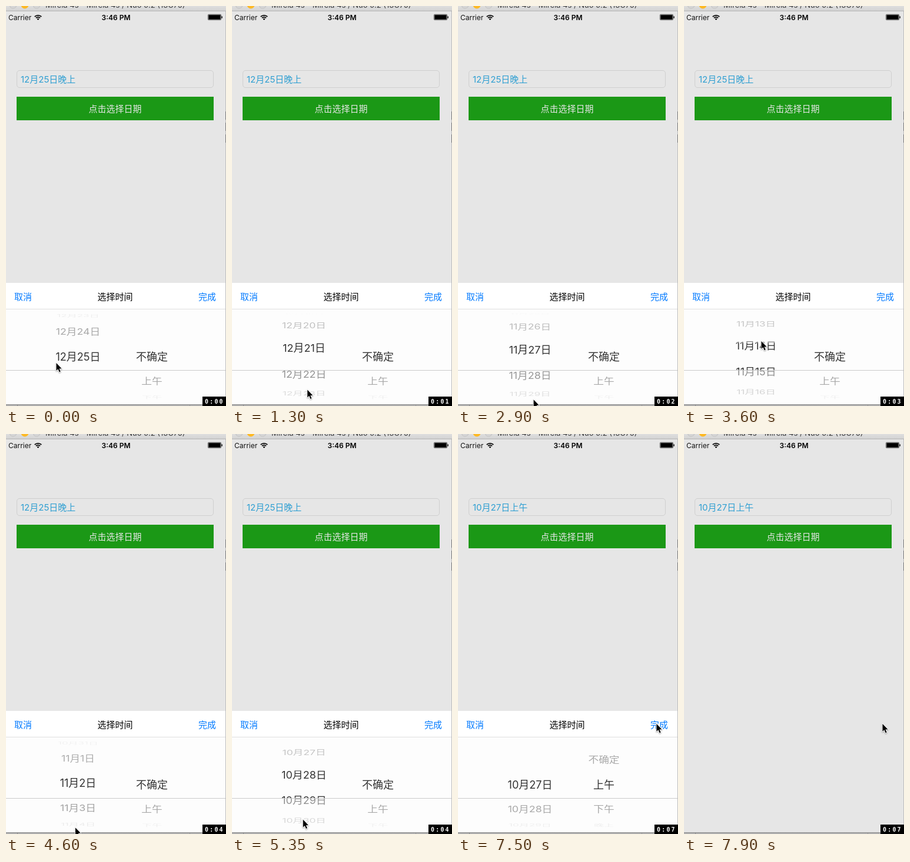
Animation of 374 by 679 pixels, one loop 8 s. Source, as an HTML page with a canvas:

```html
<!DOCTYPE html>
<html lang="zh-CN">
<head>
<meta charset="utf-8">
<style>
html, body { margin: 0; height: 100%; overflow: hidden; background: #e6e6e6; }
canvas { display: block; width: 374px; height: 679px; }
</style>
</head>
<body>
<canvas id="stage"></canvas>
<script>
const W = 374, H = 679, LOOP = 8000;
const FONT = 'Inter, "Noto Sans CJK SC", "Noto Sans CJK", sans-serif';
const canvas = document.getElementById('stage'), g = canvas.getContext('2d');
const dpr = window.devicePixelRatio || 1;
canvas.width = W * dpr;
canvas.height = H * dpr;

// Picker geometry: rows sit on a cylinder seen from the front
const MID = 595, RADIUS = 73.3, STEP = 0.61, BAND = [572, 618];
const PARTS = ['不确定', '上午', '下午', '晚上'];
const DAYS = Array.from({ length: 60 }, (_, i) => {
  const d = new Date(2015, 9, 27 + i);
  return `${d.getMonth() + 1}月${d.getDate()}日`;
});

// [time, row in the centre]
const DAY_KEYS = [[0, 59], [1300, 54.62], [2150, 43.29], [3600, 18.41], [4600, 5.2], [5950, 0]];
const PART_KEYS = [[6200, 0], [6600, 0.85], [7050, 1]];
// [time, x, y] of the pointer tip
const POINTER = [
  [0, 85, 606], [450, 120, 565], [1300, 128, 655], [1550, 129, 565], [2150, 129, 677],
  [2450, 130, 562], [2900, 128, 672], [3300, 131, 556], [3600, 131, 569], [4600, 117, 671],
  [4900, 122, 562], [5350, 120, 668], [5900, 238, 600], [6200, 245, 606], [6600, 246, 521],
  [6900, 252, 524], [7200, 337, 492]
];

const clamp = x => Math.max(0, Math.min(1, x));
const smooth = x => x * x * (3 - 2 * x);

function findSpan(keys, t) {
  let i = 0;
  while (i < keys.length - 2 && t >= keys[i + 1][0]) i++;
  return [i, clamp((t - keys[i][0]) / (keys[i + 1][0] - keys[i][0]))];
}

// Cubic curve through the keys, at rest at both ends
function glide(keys, t) {
  const [i, u] = findSpan(keys, t);
  const slope = k => k > 0 && k < keys.length - 1
    ? (keys[k + 1][1] - keys[k - 1][1]) / (keys[k + 1][0] - keys[k - 1][0]) : 0;
  const [t0, a] = keys[i], [t1, b] = keys[i + 1], v = 1 - u;
  return a + (b - a) * smooth(u) + (t1 - t0) * u * v * (slope(i) * v - slope(i + 1) * u);
}

function pointerAt(t) {
  const [i, u] = findSpan(POINTER, t), a = POINTER[i], b = POINTER[i + 1], s = smooth(u);
  return [a[1] + (b[1] - a[1]) * s, a[2] + (b[2] - a[2]) * s];
}

function rect(x, y, w, h, color) {
  g.fillStyle = color;
  g.fillRect(x, y, w, h);
}

function text(str, x, y, size, color, align = 'left', weight = 400) {
  g.font = `${weight} ${size}px ${FONT}`;
  g.textAlign = align;
  g.fillStyle = color;
  g.fillText(str, x, y);
}

function disc(x, y, r, color) {
  g.fillStyle = color;
  g.beginPath();
  g.arc(x, y, r, 0, 7);
  g.fill();
}

function clipped(x, y, w, h, draw) {
  g.save();
  g.beginPath();
  g.rect(x, y, w, h);
  g.clip();
  draw();
  g.restore();
}

function titleBar() {
  const fill = g.createLinearGradient(0, 0, 0, 9);
  fill.addColorStop(0, '#dedede');
  fill.addColorStop(1, '#d2d2d2');
  rect(0, 0, W, 9, fill);
  rect(0, 8, W, 1, '#b4b4b4');
  disc(12, -2, 6.5, '#c2c2c2');
  disc(12, -2, 5.5, '#d6d6d6');
  disc(32, -2, 6.5, '#fdb924');
  disc(52, -2, 6.5, '#c2c2c2');
  disc(52, -2, 5.5, '#d6d6d6');
  text('Mirela 4s - Mirela 4s / Nuo 9.2 (13C75)', 67, 3, 13, '#3c3c3c');
}

function statusBar() {
  text('Carrier', 4, 24, 12, '#111');
  text('3:46 PM', 187, 24, 12, '#000', 'center', 600);
  g.strokeStyle = '#000';
  g.lineWidth = 1.8;
  for (const r of [8.2, 5]) {
    g.beginPath();
    g.arc(54.5, 24, r, -Math.PI * 0.75, -Math.PI * 0.25);
    g.stroke();
  }
  g.fillStyle = '#000';
  g.beginPath();
  g.moveTo(54.5, 24);
  g.arc(54.5, 24, 2.8, -Math.PI * 0.75, -Math.PI * 0.25);
  g.fill();
  g.lineWidth = 0.6;
  g.beginPath();
  g.roundRect(343.3, 14.3, 22.4, 9.4, 1.5);
  g.stroke();
  rect(344.3, 15.2, 20.4, 7.6, '#000');
  rect(366.4, 17.4, 1.4, 3.4, '#000');
}

function form(value) {
  g.lineWidth = 1;
  g.strokeStyle = '#cfcfcf';
  g.beginPath();
  g.roundRect(18.5, 109.5, 334, 29, 4.5);
  g.stroke();
  text(value, 25, 129.5, 15, '#2f9fd2');
  rect(18, 154, 335, 40, '#1b9816');
  text('点击选择日期', 185.5, 179.5, 15, '#e6e6e6', 'center');
}

function windowEdges() {
  rect(373, 9, 1, 667, '#bcbcbc');
  for (const y of [179, 198, 218]) rect(373, y, 1, 14, '#777');
  const fill = g.createLinearGradient(0, 676, 0, 679);
  fill.addColorStop(0, '#8e8e8e');
  fill.addColorStop(1, '#bdbdbd');
  rect(0, 676, W, 3, fill);
  rect(19, 677, 1, 2, '#888');
  rect(312, 677, 1, 2, '#999');
}

function wheel(rows, pos, x, alpha) {
  rows.forEach((label, i) => {
    const a = (i - pos) * STEP, c = Math.cos(a);
    if (Math.abs(a) > 1.45) return;
    g.save();
    g.translate(x, MID + RADIUS * Math.sin(a));
    g.scale(1 - 0.08 * (1 - c), c);
    text(label, 0, 6.5, 18, `rgba(0,0,0,${alpha(c)})`, 'center');
    g.restore();
  });
}

function sheet(t, dy) {
  const day = glide(DAY_KEYS, t), part = glide(PART_KEYS, t);
  const wheels = alpha => () => {
    wheel(DAYS, day, 122.5, alpha);
    wheel(PARTS, part, 248, alpha);
  };
  const faded = wheels(c => 0.5 * c * c), solid = wheels(() => 0.8);
  const [top, bottom] = BAND;
  clipped(0, 470, 373, 206, () => {
    g.translate(0, dy);
    rect(0, 470, 373, 206, '#fdfdfd');
    rect(0, 470, 373, 44, '#fff');
    rect(0, 514, 373, 1, '#dedede');
    text('取消', 14, 498.5, 15, '#007aff');
    text('选择时间', 185.5, 498.5, 15, '#000', 'center');
    text('完成', 357, 498.5, 15, '#007aff', 'right');
    clipped(0, 515, 373, top - 515, faded);
    clipped(0, bottom, 373, 676 - bottom, faded);
    clipped(0, top, 373, bottom - top, solid);
    rect(0, bottom, 373, 1, '#cacaca');
  });
}

function pointer(x, y) {
  g.save();
  g.translate(x, y);
  g.shadowColor = 'rgba(0,0,0,.35)';
  g.shadowBlur = 2 * dpr;
  g.shadowOffsetY = dpr;
  g.lineJoin = 'round';
  g.lineWidth = 2;
  g.strokeStyle = '#fff';
  g.fillStyle = '#000';
  g.beginPath();
  g.moveTo(0.5, 0);
  g.lineTo(0.5, 13);
  g.lineTo(3.5, 10.3);
  g.lineTo(5.7, 15.4);
  g.lineTo(7.7, 14.5);
  g.lineTo(5.5, 9.6);
  g.lineTo(9.6, 9.4);
  g.closePath();
  g.stroke();
  g.shadowColor = 'transparent';
  g.fill();
  g.restore();
}

function clock(t) {
  rect(334, 663, 40, 16, '#000');
  g.font = 'bold 10px "DejaVu Sans Mono", monospace';
  g.textAlign = 'left';
  g.fillStyle = '#fff';
  const label = '0:0' + Math.floor(t * 0.94 / 1000);
  [...label].forEach((ch, i) => g.fillText(ch, 338 + i * 8.2, 674.5));
}

function draw(t) {
  g.setTransform(dpr, 0, 0, dpr, 0, 0);
  rect(0, 0, W, H, '#e6e6e6');
  titleBar();
  statusBar();
  form(t < 7500 ? '12月25日晚上' : '10月27日上午');
  windowEdges();
  const out = smooth(clamp((t - 7500) / 350));
  if (out < 1) sheet(t, out * 206);
  pointer(...pointerAt(t));
  clock(t);
}

// The picture moves in steps of 150 ms, with a short last one
function tick() {
  const t = performance.now() % LOOP;
  draw(t >= 7900 ? 7900 : Math.floor(t / 150) * 150);
  requestAnimationFrame(tick);
}
tick();
</script>
</body>
</html>
```
